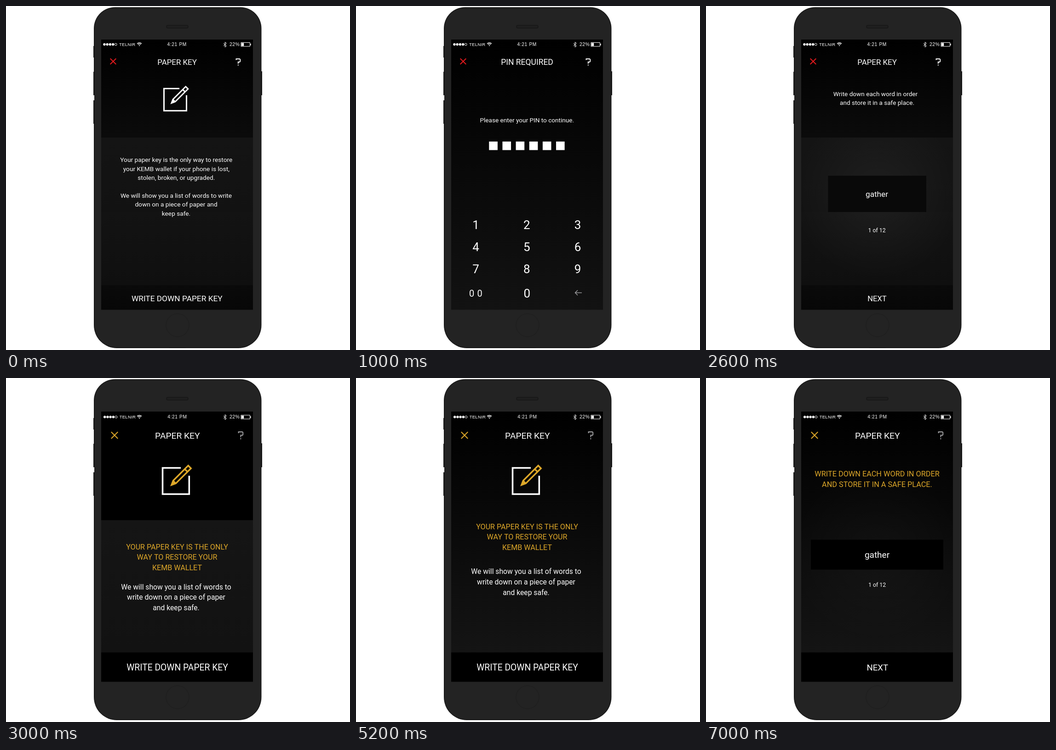
An HTML page with a canvas that plays this animation: 748 px wide and 748 px high, repeating every 8000 ms.

```html
<!DOCTYPE html>
<html lang="en">
<head>
<meta charset="utf-8">
<title>Paper key</title>
<style>
html, body { margin: 0; width: 100%; height: 100%; overflow: hidden; background: #fff; }
canvas { display: block; }
</style>
</head>
<body>
<canvas id="stage" width="748" height="748"></canvas>
<script>
const ctx = document.getElementById('stage').getContext('2d');
const WHITE = '#fff', GOLD = '#dda729', RED = '#e3191d', GREY = '#98989a';
const LOOP = 8000;

function box(x, y, w, h, fill) {
  ctx.fillStyle = fill;
  ctx.fillRect(x, y, w, h);
}

function round(x, y, w, h, r, fill) {
  ctx.fillStyle = fill;
  ctx.beginPath();
  ctx.roundRect(x, y, w, h, r);
  ctx.fill();
}

function stroke(path, color, width) {
  ctx.strokeStyle = color;
  ctx.lineWidth = width;
  ctx.stroke(new Path2D(path));
}

function fade(y, h, top, bottom) {
  const g = ctx.createLinearGradient(0, y, 0, y + h);
  g.addColorStop(0, top);
  g.addColorStop(1, bottom);
  box(207, y, 330, h, g);
}

function glow(cy, radius, alpha, top, bottom) {
  const g = ctx.createRadialGradient(372, cy, 30, 372, cy, radius);
  g.addColorStop(0, `rgba(255,255,255,${alpha})`);
  g.addColorStop(1, 'rgba(255,255,255,0)');
  box(207, top, 330, bottom - top, g);
}

function text(str, x, y, size, color = WHITE, align = 'center') {
  ctx.font = `${size}px Roboto, sans-serif`;
  ctx.textAlign = align;
  ctx.fillStyle = color;
  ctx.fillText(str, x, y);
}

function lines(list, x, y, step, size, color) {
  list.forEach((str, i) => text(str, x, y + i * step, size, color));
}

function phone() {
  box(0, 0, 748, 748, WHITE);
  for (const [y, h] of [[87, 25], [143, 51], [205, 51]]) box(190, y, 3, h, '#191919');
  box(554, 142, 3, 52, '#191919');
  round(191, 2.5, 364.5, 741.5, [46, 46, 50, 50], '#1b1b1b');
  round(193, 4.5, 360.5, 737.5, [44, 44, 48, 48], '#232323');
  box(190, 194, 2, 11, WHITE);
  box(354, 742.5, 37, 1.5, '#161616');
  round(348, 41, 49, 8, 4, '#191919');
  round(350, 43, 45, 4, 2, '#1f1f1f');
  ctx.strokeStyle = '#1f1f1f';
  ctx.lineWidth = 1.5;
  ctx.beginPath();
  ctx.arc(373, 694, 25, 0, Math.PI * 2);
  ctx.stroke();
}

function statusText(str, x, size, spacing) {
  ctx.font = `${size}px "Liberation Sans", Arial, sans-serif`;
  ctx.letterSpacing = spacing + 'px';
  ctx.textAlign = 'left';
  ctx.fillText(str, x, 86.7);
  ctx.letterSpacing = '0px';
}

function statusBar(dx, dy) {
  ctx.save();
  ctx.translate(dx, dy);
  ctx.fillStyle = ctx.strokeStyle = WHITE;
  ctx.lineWidth = 1;
  for (let i = 0; i < 5; i++) {
    ctx.beginPath();
    ctx.arc(214 + i * 6.2, 83.5, i < 4 ? 2.7 : 2.4, 0, Math.PI * 2);
    i < 4 ? ctx.fill() : ctx.stroke();
  }
  statusText('TELNIR', 246, 9.6, 0.2);
  statusText('4:21 PM', 350.5, 10.2, 0.65);
  ctx.translate(-dx, 0);
  statusText('22%', 486, 10.5, 0.35);
  for (const r of [2, 4.5, 7]) {
    ctx.beginPath();
    ctx.arc(290, 87, r, -Math.PI * 0.75, -Math.PI * 0.25);
    if (r === 2) {
      ctx.lineTo(290, 87.5);
      ctx.fill();
    } else {
      ctx.lineWidth = 1.4;
      ctx.stroke();
    }
  }
  stroke('M473 81 L479.3 86.8 L476.2 89.4 V78.4 L479.3 81 L473 86.8', WHITE, 1);
  stroke('M511 79.5 H530.5 V87.8 H511 Z', WHITE, 1);
  box(512, 80.5, 5.2, 6.3, WHITE);
  box(531.3, 82, 1.4, 3.5, WHITE);
  ctx.restore();
}

function cross(x, y, r, color) {
  stroke(`M${x - r} ${y - r} L${x + r} ${y + r} M${x + r} ${y - r} L${x - r} ${y + r}`, color, 2);
}

function help(x, y, scale, color) {
  ctx.save();
  ctx.translate(x, y);
  ctx.scale(scale, scale);
  stroke('M1 3.6 V1 H8.4 L9.7 2.2 V6.6 L8.4 7.8 H5.3 V11.6 M5.3 13.4 V15.6', color, 1.9);
  ctx.restore();
}

function noteIcon(x, y, scale, color) {
  ctx.save();
  ctx.translate(x, y);
  ctx.scale(scale, scale);
  stroke('M33.5 0 H0 V48.3 H49 V14.5', WHITE, 3);
  ctx.translate(14, 34);
  ctx.rotate(-Math.PI / 4);
  ctx.fillStyle = color;
  ctx.fill(new Path2D('M0 0 L11 -5 H52 V5 H11 Z M12.5 -2.1 H40 V2.1 H12.5 Z M43 -2.2 H49 V2.2 H43 Z'), 'evenodd');
  ctx.restore();
}

function redHeader(title, size) {
  statusBar(0, 0);
  cross(233, 120.5, 6.3, RED);
  help(499.5, 114, 1, WHITE);
  text(title, 372, 127.7, size);
}

function goldHeader() {
  statusBar(0.7, 1.3);
  cross(236, 124.5, 7.2, GOLD);
  help(504.5, 116, 1.1, GREY);
  text('PAPER KEY', 372.8, 131.8, 19.2);
}

function redPanels() {
  fade(73, 213, '#000', '#0b0b0b');
  fade(286, 161, '#141414', '#121212');
  fade(447, 160, '#131313', '#0f0f0f');
  fade(607, 53.5, '#0a0a0a', '#070707');
}

function goldPanels(split) {
  if (split) {
    box(207, 73, 330, 236.5, '#000');
    fade(309.5, 287, '#151515', '#121212');
  } else {
    fade(73, 523.5, '#000', '#141414');
  }
  box(207, 596.5, 330, 64, '#000');
}

function intro() {
  redPanels();
  redHeader('PAPER KEY', 16.9);
  noteIcon(343.5, 179.5, 1, WHITE);
  lines(['Your paper key is the only way to restore',
    'your KEMB wallet if your phone is lost,',
    'stolen, broken, or upgraded.'], 370.3, 339.4, 19.4, 13.7);
  lines(['We will show you a list of words to write',
    'down on a piece of paper and',
    'keep safe.'], 370, 417, 19.4, 13.7);
  text('WRITE DOWN PAPER KEY', 371.8, 642, 17.3);
}

function pin() {
  fade(73, 587.5, '#000', '#121212');
  redHeader('PIN REQUIRED', 17.5);
  text('Please enter your PIN to continue.', 371.8, 253, 13.6);
  for (let i = 0; i < 6; i++) box(289.3 + i * 29.15, 294.7, 18.6, 18.6, WHITE);
  for (let n = 1; n <= 9; n++) {
    const col = (n - 1) % 3, row = Math.floor((n - 1) / 3);
    text(n, 260.5 + col * 110.8, 485.2 + row * 48, 26);
  }
  text('0', 371.8, 634, 26);
  text('0', 251.7, 631.8, 20);
  text('0', 269, 631.8, 20);
  stroke('M491 623.5 H476.5 M482 618 L476.5 623.5 L482 629', GREY, 1.5);
}

function firstWord() {
  redPanels();
  glow(409, 185, 0.045, 286, 607);
  redHeader('PAPER KEY', 16.9);
  text('Write down each word in order', 368.5, 195.5, 13.6);
  text('and store it in a safe place.', 372, 215, 13.6);
  box(265.5, 369, 213.5, 79, '#090909');
  text('gather', 371.5, 415, 17.2);
  text('1 of 12', 371.5, 492, 12.3);
  text('NEXT', 372, 642, 16.5);
}

function goldIntro(split, headY, bodyY) {
  goldPanels(split);
  goldHeader();
  noteIcon(340.5, 195.5, 1.18, GOLD);
  lines(['YOUR PAPER KEY IS THE ONLY', 'WAY TO RESTORE YOUR', 'KEMB WALLET'],
    372, headY, 22.7, 16.1, GOLD);
  lines(['We will show you a list of words to',
    'write down on a piece of paper',
    'and keep safe.'], 370, bodyY, 22.7, 15.7);
  text('WRITE DOWN PAPER KEY', 372.5, 635.5, 19.3);
}

function goldWord(split, y) {
  goldPanels(split);
  if (split) glow(425, 200, 0.03, 309.5, 596.5);
  else glow(384, 190, 0.025, 210, 596.5);
  goldHeader();
  lines(['WRITE DOWN EACH WORD IN ORDER', 'AND STORE IT IN A SAFE PLACE.'],
    372, 214.4, 22.7, 16.3, GOLD);
  box(228, y, 288, 65, '#000');
  text('gather', 372, y + 39, 19);
  text('1 of 12', 372, y + 102, 12.3);
  text('NEXT', 372.8, 635.5, 18.7);
}

const scenes = [
  [1000, intro],
  [2000, pin],
  [3000, firstWord],
  [4000, () => goldIntro(true, 372.6, 459.6)],
  [6000, () => goldIntro(false, 328.6, 426.4)],
  [7000, () => goldWord(true, 391.8)],
  [LOOP, () => goldWord(false, 351.6)]
];

let start;
function frame(now) {
  start ??= now;
  const t = (now - start) % LOOP;
  phone();
  scenes.find(([end]) => t < end)[1]();
  requestAnimationFrame(frame);
}
requestAnimationFrame(frame);
</script>
</body>
</html>
```
